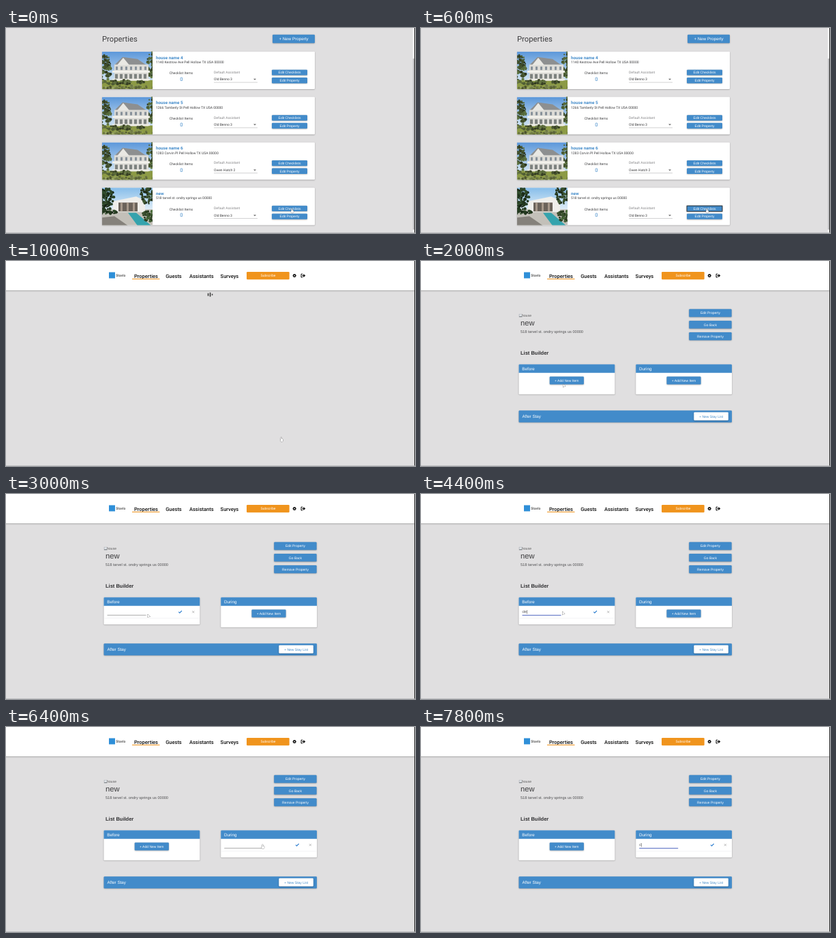
An HTML page with a canvas for the animation above (8 s loop, 600 by 302 pixels).

```html
<!DOCTYPE html>
<html lang="en">
<head>
<meta charset="utf-8">
<title>Property checklists</title>
<style>
html, body { margin: 0; width: 100%; height: 100%; overflow: hidden; background: #e0dfe0; }
canvas { display: block; width: 600px; height: 302px; }
</style>
</head>
<body>
<canvas id="stage"></canvas>
<script>
const W = 600, H = 302, LOOP = 8000, STEP = 200;
const canvas = document.getElementById('stage');
const ctx = canvas.getContext('2d');
const ratio = window.devicePixelRatio || 1;
canvas.width = W * ratio;
canvas.height = H * ratio;

const BLUE = '#428bca', ORANGE = '#f0941d', INK = '#3c3c3e', GREY = '#858587';
const PAGE = '#e0dfe0', BLACK = '#111';
const ROBOTO = 'Roboto, "Liberation Sans", sans-serif';
const ARIAL = '"Liberation Sans", Arial, sans-serif';

// Type sizes of a 1920 px wide page shown at 600 px
const px = size => size * W / 1920;
const SMALL = px(16), MEDIUM = px(20), LARGE = px(24), TITLE = px(36);

const HOUSES = [
  ['house name 4', '1140 Kestrow Ave Pell Hollow TX USA 00000', 'Old Benno 3'],
  ['house name 5', '1266 Tamberly St Pell Hollow TX USA 00000', 'Old Benno 3'],
  ['house name 6', '1283 Corvin Pl Pell Hollow TX USA 00000', 'Owen Hatch 2'],
  ['new', '518 tarvel st. ondry springs us 00000', 'Old Benno 3']
];

const POINTER_START = { x: 419, y: 266 };
const MOVES = [
  { from: 800, to: 2000, x: 208.5, y: 181 },
  { from: 2600, to: 3400, x: 207.5, y: 173 },
  { from: 5200, to: 6200, x: 376, y: 173 }
];

const ease = k => k * k * (3 - 2 * k);
const clamp = k => Math.max(0, Math.min(1, k));

function rect(x, y, w, h, fill) {
  ctx.fillStyle = fill;
  ctx.fillRect(x, y, w, h);
}

function round(x, y, w, h, r, fill, shadow) {
  ctx.save();
  if (shadow) {
    ctx.shadowColor = 'rgba(0,0,0,.32)';
    ctx.shadowBlur = 2 * ratio;
    ctx.shadowOffsetY = 0.6 * ratio;
  }
  ctx.fillStyle = fill;
  ctx.beginPath();
  ctx.roundRect(x, y, w, h, r);
  ctx.fill();
  ctx.restore();
}

function path(points) {
  ctx.beginPath();
  for (let i = 0; i < points.length; i += 2) ctx.lineTo(points[i], points[i + 1]);
}

function poly(points, fill) {
  ctx.fillStyle = fill;
  path(points);
  ctx.fill();
}

function line(points, color, width) {
  ctx.strokeStyle = color;
  ctx.lineWidth = width;
  path(points);
  ctx.stroke();
}

function text(s, x, y, size, color, family = ROBOTO, weight = 400, align = 'left') {
  ctx.font = `${weight} ${size}px ${family}`;
  ctx.fillStyle = color;
  ctx.textAlign = align;
  ctx.fillText(s, x, y);
}

function button(label, x, y, w, h, size = SMALL, fill = BLUE, color = '#fff') {
  round(x, y, w, h, 1.2, fill, true);
  text(label, x + w / 2, y + h / 2 + size * 0.35, size, color, ARIAL, 400, 'center');
}

function seeded(seed) {
  return () => {
    seed = (seed * 16807) % 2147483647;
    return seed / 2147483647;
  };
}

// Scatters leaves of one hue over an ellipse
function leaves(x, y, rx, ry, hue, light, seed) {
  const rnd = seeded(seed);
  const count = rx * ry / 2;
  for (let i = 0; i < count; i++) {
    const a = rnd() * Math.PI * 2, d = Math.sqrt(rnd());
    ctx.fillStyle = `hsl(${hue} 28% ${light * (0.6 + rnd() * 0.8)}%)`;
    ctx.beginPath();
    ctx.arc(x + rx * d * Math.cos(a), y + ry * d * Math.sin(a), 1 + rnd() * 1.4, 0, Math.PI * 2);
    ctx.fill();
  }
}

function sky(top, bottom) {
  const g = ctx.createLinearGradient(0, 0, 0, 38);
  g.addColorStop(0, top);
  g.addColorStop(1, bottom);
  rect(0, 0, 74, 56, g);
}

function oldHouse() {
  sky('#5b97da', '#c5dcf0');
  leaves(4, 25, 10, 20, 85, 26, 11);
  leaves(72, 18, 6, 20, 85, 30, 12);
  rect(0, 42, 74, 14, '#8c9a45');
  poly([18, 20, 30, 8, 52, 11, 68, 22], '#8d8f90');
  rect(18, 19, 50, 24, '#dcdbd6');
  poly([22, 20, 31, 9, 40, 20], '#e9e8e3');
  for (let i = 0; i < 7; i++) {
    rect(20 + i * 7, 22, 3, 5, '#87919a');
    rect(19 + i * 7, 33, 4, 7, '#7d827f');
  }
  rect(15, 28, 55, 3, '#f3f2ec');
  rect(15, 40, 55, 2.5, '#eeede6');
  leaves(30, 45, 34, 3, 80, 28, 13);
  leaves(40, 53, 38, 3, 72, 38, 14);
}

function newHouse() {
  sky('#86bdea', '#f0f6f9');
  rect(0, 32, 74, 24, '#c3c0b9');
  poly([16, 20, 50, 13, 63, 19, 63, 36, 16, 36], '#efeeea');
  rect(24, 22, 28, 13, '#6b635a');
  for (let i = 0; i < 3; i++) rect(27 + i * 9, 22, 3, 13, '#a6988a');
  leaves(6, 14, 13, 15, 110, 17, 21);
  leaves(66, 10, 10, 14, 100, 20, 22);
  leaves(8, 35, 14, 5, 110, 18, 23);
  poly([38, 37, 50, 37, 72, 56, 52, 56], '#35a3ad');
  leaves(68, 42, 11, 8, 100, 25, 24);
  poly([0, 44, 18, 42, 38, 56, 0, 56], '#85817b');
}

function photo(x, y, paint) {
  ctx.save();
  ctx.beginPath();
  ctx.rect(x, y, 74, 55.2);
  ctx.clip();
  ctx.translate(x, y);
  paint();
  ctx.restore();
}

function propertyCard([name, address, helper], i) {
  const y = 34.8 + i * 66.8;
  round(141, y, 312, 55.2, 1, '#fff', true);
  photo(141, y, name === 'new' ? newHouse : oldHouse);
  text(name, 220, y + 10.7, MEDIUM, BLUE, ROBOTO, 700);
  text(address, 220, y + 17.2, SMALL, INK);
  text('Checklist Items', 257, y + 33.3, SMALL, INK, ROBOTO, 400, 'center');
  text('0', 257.3, y + 43.2, LARGE, BLUE, ROBOTO, 400, 'center');
  text('Default Assistant', 305, y + 32, SMALL, GREY);
  text(helper, 305, y + 42.6, SMALL, INK);
  poly([363, y + 40, 367, y + 40, 365, y + 42], '#666');
  line([305, y + 45.3, 369, y + 45.3], '#a5a5a7', 0.5);
  button('Edit Checklists', 390, y + 26.6, 52, 8.2);
  button('Edit Property', 390, y + 38.2, 52, 8.4);
}

function listPage(focused) {
  text('Properties', 141, 19.6, TITLE, INK);
  button('+ New Property', 391, 9.8, 62, 12.4, MEDIUM);
  HOUSES.forEach(propertyCard);
  if (focused) {
    ctx.strokeStyle = '#222';
    ctx.lineWidth = 0.9;
    ctx.strokeRect(390, 262, 52, 8.2);
  }
  rect(596.5, 0, 2.5, H, '#f2f2f2');
  rect(596.8, 45, 2.2, 252, '#bdbdbf');
}

function gear(x, y) {
  ctx.save();
  ctx.translate(x, y);
  for (let i = 0; i < 8; i++) {
    rect(-0.6, -2.6, 1.2, 1.4, BLACK);
    ctx.rotate(Math.PI / 4);
  }
  ctx.strokeStyle = BLACK;
  ctx.lineWidth = 1.2;
  ctx.beginPath();
  ctx.arc(0, 0, 1.45, 0, Math.PI * 2);
  ctx.stroke();
  ctx.restore();
}

function exitIcon(x, y) {
  line([x + 2.2, y - 2.4, x, y - 2.4, x, y + 2.4, x + 2.2, y + 2.4], BLACK, 1);
  rect(x + 1.5, y - 0.8, 2.2, 1.6, BLACK);
  poly([x + 3.4, y - 2.6, x + 6.3, y, x + 3.4, y + 2.6], BLACK);
}

function navBar() {
  round(-4, -4, W + 8, 47.3, 0, '#fff', true);
  rect(151, 16.5, 9, 9, '#2f8fd8');
  text('Stavlo', 161.3, 23.4, SMALL, '#444', ROBOTO, 500);
  const links = { Properties: 188, Guests: 234.2, Assistants: 269, Surveys: 314.6 };
  for (const [label, x] of Object.entries(links)) text(label, x, 24.5, LARGE, BLACK, ROBOTO, 500);
  rect(185, 26, 40.5, 1, ORANGE);
  round(353, 16, 62.7, 11.2, 1.2, ORANGE);
  text('Subscribe', 384.5, 23.3, SMALL, '#fff', ARIAL, 400, 'center');
  gear(423.2, 21.6);
  exitIcon(433, 21.6);
}

function loader(t) {
  for (let i = 0; i < 3; i++) {
    const h = 2 + ((i + t / STEP - 4) % 3) * 2;
    rect(295.8 + i * 3, 49.5 - h / 2, 1.5, h, '#333');
  }
}

function listCard(title, x, form) {
  const y = 152.2, w = 140.8;
  round(x, y, w, form ? 40 : 44.3, 1.2, '#fff', true);
  round(x, y, w, 12.6, [1.2, 1.2, 0, 0], BLUE);
  text(title, x + 4.8, y + 8.7, MEDIUM, '#fff', ARIAL);
  if (form) itemForm(x + 5, 178.2, form);
  else button('+ Add New Item', x + 45.2, y + 18, 50.2, 11.6);
}

function itemForm(x, y, { value, focus, caret }) {
  text(value, x, y - 2.8, SMALL, INK, ARIAL);
  if (caret) rect(x + ctx.measureText(value).width + 0.2, y - 7.2, 0.5, 5.6, '#222');
  rect(x, y, 57, focus ? 1 : 0.6, focus ? '#4d63bd' : '#777');
  const mid = y - 4.5, cross = x + 126.2;
  line([x + 104.7, mid, x + 106.3, mid + 1.5, x + 109.4, mid - 1.7], '#2f7fd0', 1.1);
  for (const s of [-1.5, 1.5]) line([cross - 1.5, mid - s, cross + 1.5, mid + s], '#9a9a9a', 0.7);
  line([x - 4, y + 4.8, x + 135, y + 4.8], '#ebebee', 0.6);
}

function beforeForm(t) {
  if (t < 2800 || t >= 5400) return null;
  const typed = t < 3800 ? 0 : 1 + Math.max(0, (t - 4000) / STEP);
  return { value: 'clean'.slice(0, typed), focus: t >= 3200, caret: t >= 3200 };
}

function duringForm(t) {
  if (t < 6400) return null;
  const focus = t >= 7000;
  return { value: t >= 7600 ? 'c' : '', focus, caret: focus && t !== 7600 };
}

function detailPage(t) {
  rect(143.8, 78, 4.6, 4.8, '#9b9fa3');
  rect(144.3, 78.5, 3.6, 2.4, '#e9edf2');
  text('house', 148.3, 82.3, SMALL, '#555', ARIAL);
  text('new', 146, 94.8, TITLE, INK, ARIAL);
  text(HOUSES[3][1], 146, 105.5, px(18), '#505052', ARIAL);
  text('List Builder', 146, 138.2, LARGE, '#2e2e30', ARIAL, 700);
  ['Edit Property', 'Go Back', 'Remove Property'].forEach((label, i) =>
    button(label, 393.2, 70.8 + i * 17.1, 62.5, 11.7));
  listCard('Before', 143.5, beforeForm(t));
  listCard('During', 315.2, duringForm(t));
  round(143.5, 220.3, 312.5, 17.4, 1.2, BLUE, true);
  text('After Stay', 148.5, 231.1, MEDIUM, '#fff', ARIAL);
  button('+ New Stay List', 400.3, 222.8, 50.6, 12, SMALL, '#fff', BLUE);
}

function pointerAt(t) {
  let { x, y } = POINTER_START;
  for (const m of MOVES) {
    const k = ease(clamp((t - m.from) / (m.to - m.from)));
    x += (m.x - x) * k;
    y += (m.y - y) * k;
  }
  return [x, y];
}

function pointer(t) {
  if (t >= 7200) return;
  const hand = t <= 1000 || (t >= 6200 && t <= 6400);
  ctx.save();
  ctx.translate(...pointerAt(t));
  ctx.strokeStyle = '#222';
  ctx.lineWidth = 0.5;
  ctx.fillStyle = '#fff';
  if (hand) {
    ctx.beginPath();
    ctx.roundRect(-0.2, 0, 1.2, 4, 0.6);
    ctx.roundRect(-0.8, 2.4, 3.6, 3.8, 1);
  } else {
    path([0, 0, 0, 5, 1.3, 3.8, 3.4, 3.6]);
    ctx.closePath();
  }
  ctx.stroke();
  ctx.fill();
  ctx.restore();
}

function draw(now) {
  const t = Math.floor((now % LOOP) / STEP) * STEP;
  ctx.setTransform(ratio, 0, 0, ratio, 0, 0);
  ctx.textRendering = 'geometricPrecision';
  rect(0, 0, W, H, PAGE);
  if (t < 800) {
    listPage(t >= 600);
  } else {
    navBar();
    if (t < 1200) loader(t);
    else detailPage(t);
  }
  rect(599, 0, 1, H, '#2b2b2b');
  rect(0, 301.3, W, 0.7, '#b4b4b6');
  pointer(t);
}

const start = performance.now();
function tick() {
  draw(performance.now() - start);
  requestAnimationFrame(tick);
}
tick();
</script>
</body>
</html>
```
